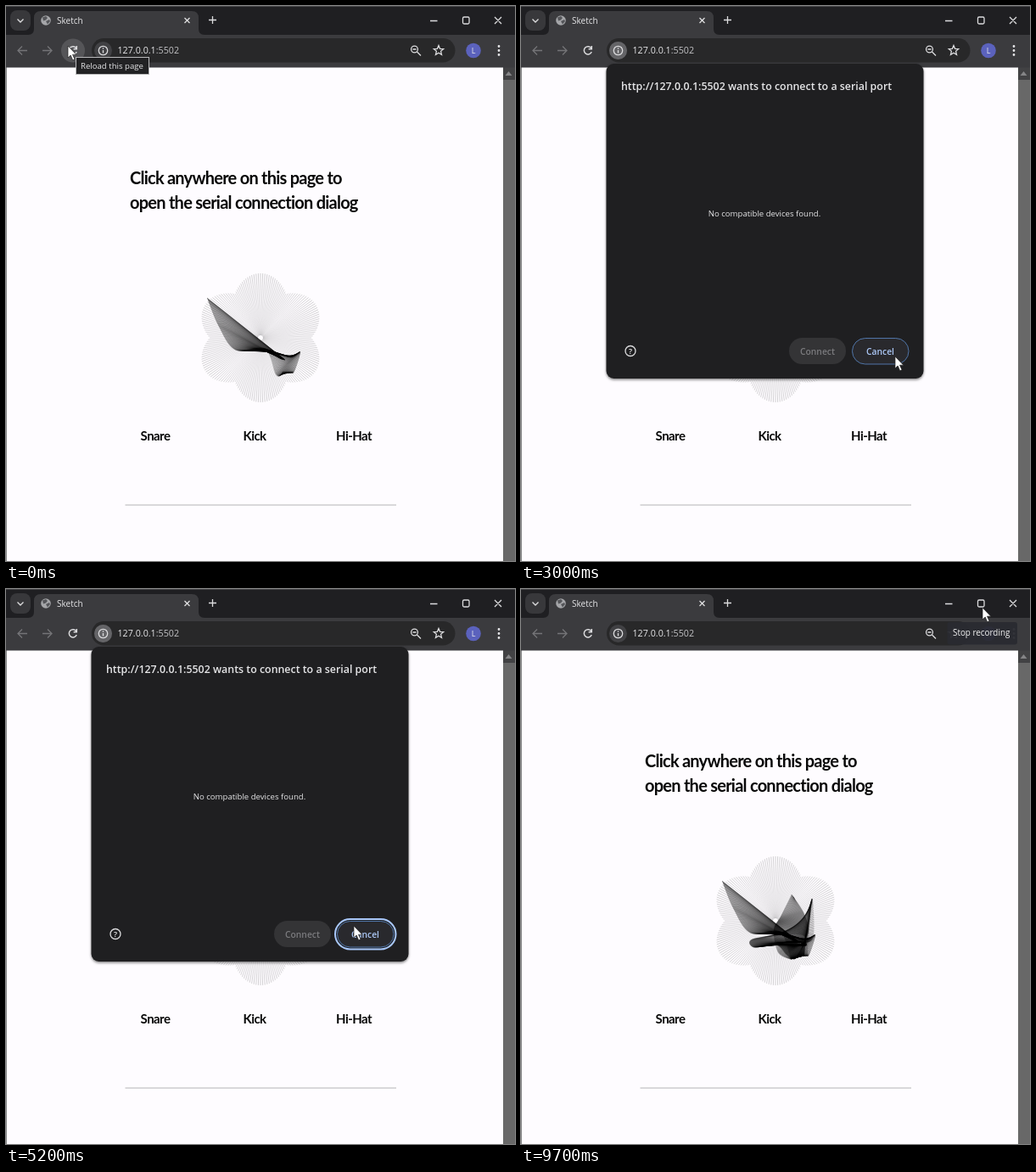
An HTML page for the animation above (9800 ms loop, 600x654 px).

```html
<!DOCTYPE html>
<html lang="en">
<head>
<meta charset="utf-8">
<title>Sketch</title>
<style>
  html, body { margin: 0; width: 100%; height: 100%; overflow: hidden; background: #fefcff; }
  svg { display: block; width: 600px; height: 654px; font-family: "Open Sans", sans-serif; }
  .line { fill: none; stroke: #dcdcde; stroke-width: 1.3; }
  .ui { fill: #e6e6e8; }
  .hand { font-family: Lato, sans-serif; font-weight: 700; fill: #080808; }
  .big { font-size: 20px; letter-spacing: -.75px; }
  .small { font-size: 15px; letter-spacing: -.55px; text-anchor: middle; }
  .button { font-size: 10.3px; font-weight: 600; text-anchor: middle; }
</style>
</head>
<body>
<svg viewBox="0 0 600 654">
  <defs>
    <radialGradient id="fade" gradientUnits="userSpaceOnUse" cx="300" cy="391" r="76">
      <stop offset="0" stop-opacity=".04"/>
      <stop offset="1" stop-opacity=".3"/>
    </radialGradient>
    <filter id="shadow" x="-10%" y="-10%" width="120%" height="120%" color-interpolation-filters="sRGB">
      <feDropShadow dx="0" dy="1.5" stdDeviation="1.8" flood-opacity=".5"/>
    </filter>
  </defs>

  <!-- Page -->
  <rect width="600" height="654" fill="#fefcff"/>
  <g class="hand big">
    <text x="146" y="210">Click anywhere on this page to</text>
    <text x="146" y="239">open the serial connection dialog</text>
  </g>
  <path id="flower" fill="none" stroke="url(#fade)" stroke-width=".6"/>
  <g id="wings" stroke="#000" stroke-width=".5" stroke-opacity=".55"/>
  <g class="hand small">
    <text x="176" y="512">Snare</text>
    <text x="293" y="512">Kick</text>
    <text x="410" y="512">Hi-Hat</text>
  </g>
  <path d="M140.5 588H460" stroke="#b4b4b6"/>
  <path d="M.5 72V654" stroke="#8a8a8c"/>
  <rect x="586" y="72" width="14" height="582" fill="#686868"/>
  <rect x="586" y="72" width="14" height="15" fill="#424244"/>
  <path d="M588.5 82l4-5 4 5z" fill="#858587"/>

  <!-- Browser frame -->
  <rect width="600" height="35" fill="#1f1f22"/>
  <path d="M0 .5H600" stroke="#47474a"/>
  <rect y="34" width="600" height="38.5" fill="#3b3b3e"/>
  <path d="M26 34q7 0 7-7V14q0-8 8-8H219q8 0 8 8V27q0 7 7 7z" fill="#3b3b3e"/>
  <rect x="5" y="5" width="24" height="24" rx="8" fill="#38383b"/>
  <path class="line" d="M13.5 15.5l3.5 3.5 3.5-3.5M210.5 14l6 6m0-6l-6 6M239 16.5h9m-4.5-4.5v9M500 17.5h8.5M576 13l8 8m0-8l-8 8"/>
  <rect class="line" x="538.5" y="13" width="7.5" height="8" rx="1.5"/>
  <circle cx="47" cy="17" r="5.8" fill="#a5a6a9"/>
  <path d="M43 13.5l4-1.5 2 2-2 2.5-3 1zM47 18l4-2 1 2-3 3.5z" fill="#55565a"/>
  <text class="ui" x="60" y="20.8" font-size="10">Sketch</text>
  <path class="line" style="stroke:#747477" d="M25 52.5H14m5-5l-5 5 5 5M43 52.5H54m-5-5l5 5-5 5"/>
  <circle id="reloadHover" cx="79" cy="52.5" r="14" fill="#555558"/>
  <path class="line" style="stroke-width:1.5" d="M82.8 49.8a4.6 4.6 0 1 0 .4 4.2M83.3 47v3.7h-3.7"/>
  <rect x="101" y="38" width="428.5" height="28.5" rx="14.2" fill="#282829"/>
  <circle cx="114.5" cy="52.5" r="10.5" fill="#414144"/>
  <circle id="infoHover" cx="114.5" cy="52.5" r="10.5" fill="#646467"/>
  <circle class="line" cx="114.5" cy="52.5" r="5.2"/>
  <path class="line" d="M114.5 49.3v1.4m0 1.3v3.6"/>
  <text class="ui" x="131.5" y="56.3" font-size="10.7">127.0.0.1<tspan fill="#c2c2c5">:5502</tspan></text>
  <circle class="line" cx="481.5" cy="51" r="3.9"/>
  <path class="line" d="M484.5 54l4.5 4.5M479.5 51h4"/>
  <path id="star" class="line"/>
  <circle cx="551" cy="52.5" r="8.8" fill="#5b62bd"/>
  <text x="551" y="55.8" font-size="9" text-anchor="middle" fill="#eee">L</text>
  <path d="M581 47.5v10.1" stroke="#e6e6e8" stroke-width="2.8" stroke-linecap="round" stroke-dasharray="0 5"/>

  <!-- Serial port dialog -->
  <g id="dialog">
    <rect x="100.5" y="68" width="374" height="371" rx="9" fill="#1f1f21" filter="url(#shadow)"/>
    <text class="ui" x="118" y="99" font-size="12.4" font-weight="600">http://127.0.0.1:5502 wants to connect to a serial port</text>
    <text class="ui" x="287" y="247.5" font-size="9.6" text-anchor="middle">No compatible devices found.</text>
    <circle class="line" cx="129" cy="406.5" r="6"/>
    <text class="ui button" x="129" y="410" style="font-size:9px">?</text>
    <rect x="316" y="391" width="67" height="31" rx="15.5" fill="#343436"/>
    <text class="button" x="349.5" y="410.5" fill="#7b7b7e">Connect</text>
    <rect id="cancel" x="390.5" y="391.5" width="66.5" height="30.5" rx="15.2" stroke="#5075a8"/>
    <rect id="ring" x="388" y="389" width="71.5" height="35.5" rx="17.7" fill="none" stroke="#a8c7fa" stroke-width="2"/>
    <text class="button" x="423.5" y="410.5" fill="#adc9f8">Cancel</text>
  </g>

  <g id="reloadTip">
    <rect x="82.5" y="60.5" width="86" height="20" fill="#222224" stroke="#b9b9bb"/>
    <text class="ui" x="88" y="74" font-size="9.6">Reload this page</text>
  </g>
  <g id="stopTip">
    <rect x="502.5" y="39" width="82.5" height="26.5" rx="3" fill="#2a2b31" fill-opacity=".95"/>
    <text x="509" y="55.3" font-size="9.9" fill="#f4f4f4">Stop recording</text>
  </g>
  <path id="cursor" d="M0 0V14L3.2 11 5.7 16.8 8 15.8 5.5 10.2H9.8Z" fill="#fff" stroke="#222" stroke-width=".7"/>
</svg>
<script>
const LOOP = 9800, STEP = 100;
const $ = id => document.getElementById(id);
const ramp = (t, a, b) => Math.min(1, Math.max(0, (t - a) / (b - a)));
const smooth = u => u * u * (3 - 2 * u);
const show = (id, opacity) => $(id).setAttribute('opacity', +opacity);

// Point at angle a, clockwise from the top.
const polar = (cx, cy, r, a) => `${cx + r * Math.sin(a)} ${cy - r * Math.cos(a)}`;

$('flower').setAttribute('d', Array.from({ length: 180 }, (_, i) => {
  const a = i * Math.PI / 90;
  return `M${polar(300, 391, 3, a)}L${polar(300, 391, 60 + 16 * Math.abs(Math.cos(3 * a)), a)}`;
}).join(''));
$('star').setAttribute('d', 'M' + Array.from({ length: 10 }, (_, i) =>
  polar(510, 52.5, i % 2 ? 2.7 : 6, i * Math.PI / 5)).join('L') + 'Z');

// One straight strand glides through these poses (x1, y1, x2, y2) and leaves a trail.
const poses = [
  [237, 344, 329, 417], [250, 376, 323, 415], [270, 405, 312, 406],
  [305, 404, 336, 414], [318, 434, 347, 408], [326, 431, 338, 431],
  [332, 408, 343, 365], [275, 412, 344, 412], [274, 422, 322, 415],
  [300, 419, 336, 420], [312, 430, 335, 416], [318, 436, 334, 432],
  [303, 428, 336, 414], [298, 402, 339, 400], [306, 386, 333, 381],
  [319, 360, 322, 364],
];
const DRAWN = 5;       // poses already passed when the loop starts
const PER_POSE = 40;   // strands between two poses
const LAST = poses.length - 1;

// Catmull-Rom spline through the poses.
function poseAt(p) {
  const k = Math.min(Math.floor(p), LAST - 1), u = p - k;
  const at = i => poses[Math.min(LAST, Math.max(0, i))];
  const [a, b, c, d] = [at(k - 1), at(k), at(k + 1), at(k + 2)];
  return b.map((v, i) => v + u / 2 * (c[i] - a[i] +
    u * (2 * a[i] - 5 * v + 4 * c[i] - d[i] + u * (3 * (v - c[i]) + d[i] - a[i]))));
}

const strands = Array.from({ length: LAST * PER_POSE + 1 }, (_, i) => {
  const [x1, y1, x2, y2] = poseAt(i / PER_POSE);
  const path = document.createElementNS('http://www.w3.org/2000/svg', 'path');
  path.setAttribute('d', `M${x1} ${y1}L${x2} ${y2}`);
  return $('wings').appendChild(path);
});

// Pointer moves: start time, end time, destination.
const moves = [
  [1000, 1600, 380, 300],
  [2200, 2800, 441, 413],
  [4400, 5000, 410, 397],
  [5500, 5850, 510, 396],
  [6200, 6900, 544, 22],
];

function pointer(t) {
  let x = 73, y = 47;
  for (const [a, b, tx, ty] of moves) {
    const u = smooth(ramp(t, a, b));
    x += (tx - x) * u;
    y += (ty - y) * u;
  }
  return [x, y];
}

function render(t) {
  const drawn = PER_POSE * (DRAWN + (LAST - DRAWN) * ramp(t, 0, LOOP - STEP));
  strands.forEach((s, i) => s.style.display = i <= drawn ? '' : 'none');

  const [x, y] = pointer(t);
  $('cursor').setAttribute('transform', `translate(${x} ${y})`);

  const open = ramp(t, 1800, 2000) - ramp(t, 3100, 3200) + ramp(t, 4200, 4400) - ramp(t, 5400, 5500);
  show('dialog', open);
  $('dialog').setAttribute('transform',
    `translate(287.5 253.5) scale(${0.95 + 0.05 * open}) translate(-287.5 -253.5)`);
  show('infoHover', open > 0.9);
  show('ring', t < 2900 || t > 4000);
  const hover = x > 390 && x < 457 && y > 391 && y < 422;
  $('cancel').setAttribute('fill', hover ? '#29292d' : '#1f1f21');

  show('reloadHover', t < 1000);
  show('reloadTip', t < 600);
  show('stopTip', ramp(t, 7200, 7500));
}

function frame() {
  render(Math.floor(performance.now() % LOOP / STEP) * STEP);
  requestAnimationFrame(frame);
}
frame();
</script>
</body>
</html>
```
